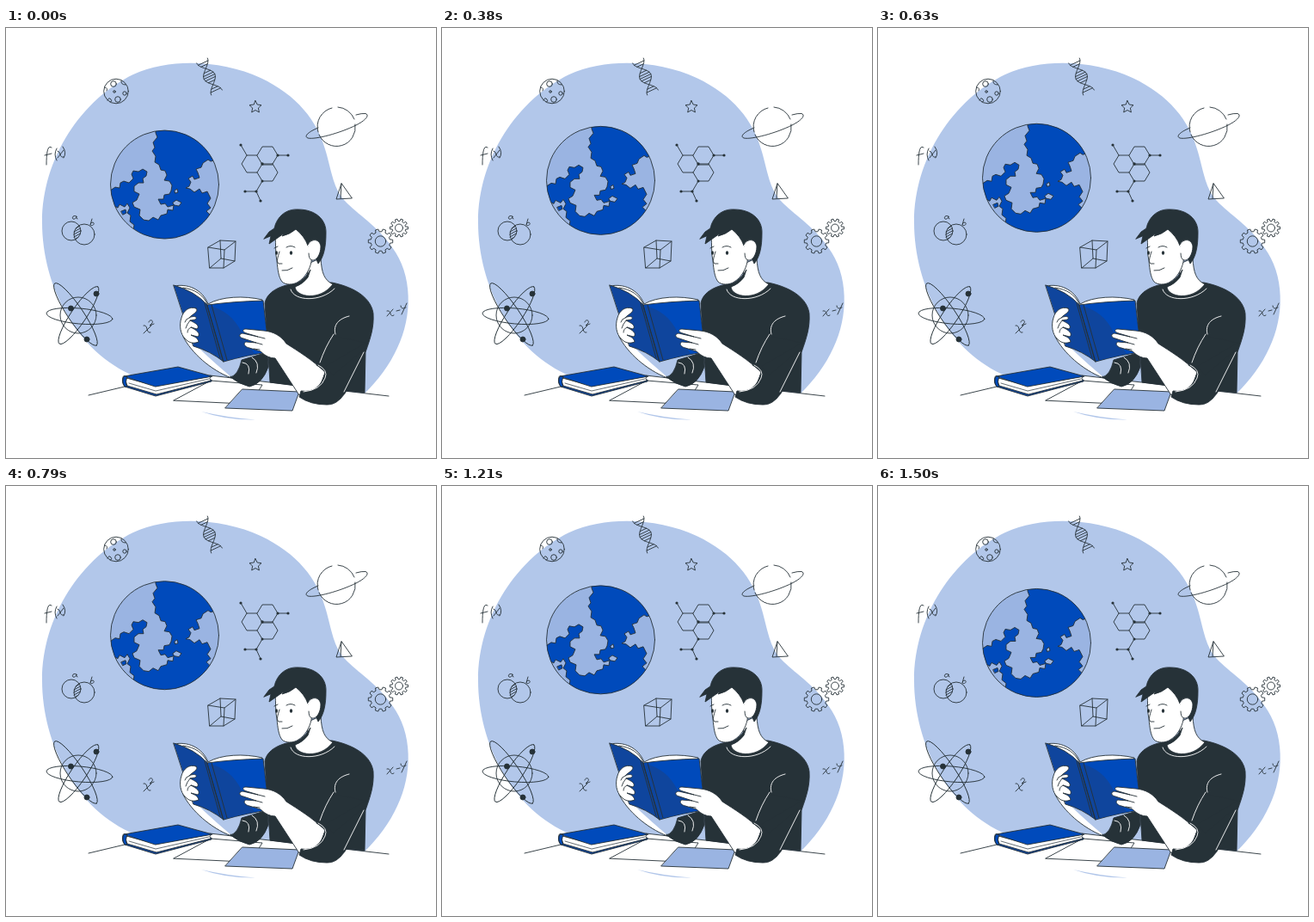
Write an HTML page that moves like this. It is 500 by 500 pixels and loops after 1540 ms.

```html
<!DOCTYPE html>
<html lang="en">
<head>
<meta charset="utf-8">
<title>Student reading</title>
<style>
  html, body { margin: 0; width: 100%; height: 100%; overflow: hidden; background: #fff; }
  svg { display: block; width: 100vw; height: 100vh; }
  .line { fill: none; }
  .white { fill: #fff; }
  .blue { fill: #004abb; }
  .navy { fill: #0f459d; }
  .pale { fill: #9ab4e2; }
  .sky { fill: #b2c7ea; stroke: none; }
  .dark { fill: #263238; }
  .crease { fill: none; stroke: #fff; }
</style>
</head>
<body>
<svg viewBox="0 0 500 500" stroke="#263238" stroke-width=".9" stroke-linecap="round" stroke-linejoin="round">
  <defs>
    <clipPath id="disc"><circle cx="184.5" cy="182" r="63"/></clipPath>
    <clipPath id="lens"><circle cx="76" cy="236" r="11"/></clipPath>
  </defs>

  <!-- backdrop and table -->
  <path class="sky" d="M42 226C42 151 88 83 148 54C193 34 252 38 296 58C338 78 362 107 372 144C379 169 381 187 394 201C409 217 431 229 449 255C473 287 473 335 455 372C446 392 433 409 417 425L150 428V405C82 377 42 300 42 226Z"/>
  <path class="white" stroke="none" d="M96 427L200 402L238 404L445 428L470 500H60Z"/>
  <path class="sky" d="M227 446Q257 453 290 455.5Q255 456 227 446Z"/>
  <path class="line" d="M96 427L138 417M237 404L445 428"/>

  <!-- floating globe -->
  <g id="globe">
    <circle class="pale" cx="184.5" cy="182" r="63" stroke="none"/>
    <g class="blue" clip-path="url(#disc)">
      <path d="M174 115L174 122L176 127L171 133L173 139L170 143L174 149L173 156L178 159L180 165L185 166L187 171L184 177L190 178L193 183L192 189L190 193L184 194L183 199L177 199L180 205L185 204L188 208L195 206L194 212L188 211L187 216L180 218L177 223L171 220L166 224L160 223L155 218L156 211L149 208L147 203L152 200L155 193L149 190L149 184L154 180L160 180L159 175L163 172L164 167L159 164L154 167L148 166L146 170L148 175L143 180L137 178L133 180L132 186L127 185L118 191L124 206L130 209L132 205L138 208L141 204L144 209L141 215L145 218L144 225L149 229L148 235L160 250L210 250L240 230L237 217L233 213L238 209L234 204L238 198L234 190L228 192L225 187L219 191L214 187L209 186L213 184L215 179L212 175L217 172L219 176L225 174L223 168L221 164L227 162L229 157L235 153L238 155L245 153L240 110Z"/>
      <path d="M134 213L139 211L140 215L136 217Z"/>
      <path class="pale" d="M196 189L199 187L200 191L197 192ZM194 203L198 200L204 203L201 207L196 206Z"/>
    </g>
    <circle class="line" cx="184.5" cy="182" r="63"/>
  </g>

  <!-- science doodles -->
  <g class="line">
    <circle cx="128" cy="73.5" r="14.3"/>
    <circle cx="125" cy="65" r="3.3"/><circle cx="130" cy="83" r="3.3"/>
    <circle cx="138" cy="76" r="2.2"/><circle cx="126" cy="74" r="1.3"/><path d="M134 61q-1 5 5 5M115 69q4 1 2 4M118 84q2-4 4-1t-1 3"/>

    <path id="helix"/>
    <path d="M290 84.5L292.2 89L297 89.7L293.4 93L294.4 98L290 95.5L285.7 98L286.7 93L283 89.7L288 89Z"/>
    <path d="M363 121A22 22 0 0 1 379 93M386 92A22 22 0 0 1 405 106M406 112A22 22 0 0 1 364 124M363 116C351 121 346 126 351 128C360 130 389 122 407 113C419 107 423 101 418 99.5Q414 99 407 101"/>
    <path d="M292 148L298 138H310L316 148L310 158H298ZM292 148H280L274 158L280 168H292L298 158M292 168L298 178H310L316 168L310 158M280 148L273 136M316 148H328M298 178L291 190H278M291 190L296 201M298 159H310"/>
    <g class="dark" stroke="none"><circle cx="273" cy="136" r="1.6"/><circle cx="328" cy="148" r="1.6"/><circle cx="316" cy="148" r="1.6"/><circle cx="298" cy="158" r="1.7"/><circle cx="298" cy="178" r="1.5"/><circle cx="278" cy="190" r="1.6"/><circle cx="291" cy="190" r="1.6"/><circle cx="296" cy="201" r="1.6"/></g>
    <path d="M390 181L384 199L402 198ZM390 181L389 198"/>
    <path id="gearA"/><circle cx="435.5" cy="248" r="6.2"/>
    <path id="gearB"/><circle cx="457" cy="232.5" r="4.5"/>

    <path d="M235 255L249 247L267 248L266 271L253 279L237 279ZM235 255L254 258L267 248M254 258L253 279M249 247L250 268L266 271M250 268L237 279"/>
    <circle cx="76" cy="236" r="11"/><circle cx="91" cy="240" r="12"/>
    <path clip-path="url(#lens)" d="M81 233L88 229M79 237L88 232M79 240L88 235M79 243L88 238M81 245L88 241"/>
    <path d="M82 219C79 217 76 220 78 222C80 223 82 220 82 219Q81 222 83 222M100 222L98 229C101 231 104 227 101 226Q99 226 98 228"/>
    <path d="M53 139C49 136 47 142 47 159M45 148L53 146M59 140Q55 147 59 154M60 143Q62 143 63 147T67 150M67 142L60 151M66 138Q71 145 67 151"/>
    <path d="M160 346Q163 345 164 350T168 354M169 346L160 355M166 342C167 338 172 340 170 343L167 346L172 344"/>
    <path d="M443 329Q446 328 447 332T451 334M450 327L443 335M454 329L458 328M459 323Q459 328 465 325M466 320L460 333"/>
    <circle cx="84" cy="334" r="21"/>
    <ellipse cx="85.5" cy="335" rx="38.5" ry="9" transform="rotate(5 85.5 335)"/>
    <ellipse cx="81" cy="333" rx="43.5" ry="9" transform="rotate(56 81 333)"/>
    <ellipse cx="84.5" cy="334" rx="40" ry="9" transform="rotate(-56 84.5 334)"/>
    <g class="dark"><circle cx="105" cy="309" r="3"/><circle cx="75.5" cy="326" r="3"/><circle cx="94" cy="362" r="3"/></g>
  </g>

  <!-- closed book and papers -->
  <path class="white" d="M195 433L238 410L298 415L284 437Z"/>
  <path class="pale" d="M275 420L341 423L333 445L255 442Z"/>
  <path class="navy" d="M136 406Q134 412 138 417L174 428L239 411V409L175 425L141 415Z"/>
  <path class="white" d="M140 407L174 416L238 405Q236 408 238 410L175 426L141 416Q138 411 140 407Z"/>
  <path class="line" stroke-width=".7" d="M143 413L174 422L236 408"/>
  <path class="blue" d="M137 405L200 394L240 405L174 417Z"/>
  <path class="blue" d="M137 405Q134 411 138 417L141 417Q138 411 141 406Z"/>

  <!-- reader -->
  <path class="dark" d="M331 298C314 301 303 309 301 320L307 412L345 417L417 424L418 377C424 360 428 348 427 332C425 316 409 302 379 296Z"/>
  <path class="white" d="M352 274L350 289L336 301C337 313 365 318 380 298C370 293 367 285 366 268Z"/>
  <path class="crease" d="M331 304C335 318 366 319 382 303"/>
  <path class="dark" d="M335 298C344 295 350 288 354 281L351 290Q345 298 336 301Z"/>
  <path class="white" d="M313 242C314 252 313 262 315 271C316 281 317 290 321 295C325 299 334 299 340 295C348 290 353 281 355 272L357 240L336 229Z"/>
  <path class="dark" d="M300 245L306 237L312 233C315 219 326 210 340 211C360 211 373 223 372 239C372 253 370 266 363 274L358 262L351 253Q347 242 337 234Q330 240 321 242L323 239L306 251L308 242Z"/>
  <path class="white" d="M351 252C355 244 365 245 366 254C366 263 361 271 356 270Q352 269 352 262"/>
  <path class="line" d="M318 260C316 267 314 272 317 274L321 274M321 282Q327 283 333 279M312 256L316 254M326 255Q331 252 336 255"/>
  <g class="dark" stroke="none"><ellipse cx="314.5" cy="261.5" rx="1.5" ry="2.2"/><ellipse cx="331.5" cy="261.5" rx="1.6" ry="2.3"/></g>

  <path class="white" d="M206 359C216 378 237 397 262 407L256 390L240 365Z"/>
  <path class="sky" d="M224 372L250 384L275 384L270 398L261 405Q244 391 224 372Z"/>
  <path class="dark" d="M261 406Q270 404 274 386L304 377L305 394Q298 414 283 417Q271 414 261 406Z"/>
  <path class="crease" d="M275 389Q285 390 282 402M286 383Q296 389 291 401"/>

  <!-- open book -->
  <path class="white" d="M196 300C210 297 228 303 235 321C250 312 277 311 298 316L290 330L236 330Z"/>
  <path class="line" d="M206 302C220 304 229 310 234 321"/>
  <path class="navy" d="M195 299Q220 306 234 322L253 388Q238 376 218 370Z"/>
  <path class="blue" d="M234 322Q264 318 299 317L306 377Q281 380 253 388Z"/>
  <path class="navy" stroke="none" d="M236 323C254 327 266 338 273 352L289 379L253 387Z"/>
  <path class="line" d="M234 322L253 388M239 322L257 386M231 320L249 384"/>

  <!-- hands and near sleeve -->
  <path class="white" d="M221 326C213 323 206 329 204 337C201 346 203 356 208 361C213 367 219 367 224 365C223 360 219 359 215 357L223 359C227 355 221 351 215 348L222 350C226 346 220 343 214 340L220 339C224 336 218 334 213 337C216 333 225 330 221 326Z"/>
  <path class="line" d="M213 337Q209 338 208 342M214 340Q210 345 209 349M215 348Q211 350 211 354"/>
  <path class="white" d="M371 400C355 385 340 376 326 367C320 358 311 353 300 352L279 350C274 350 275 354 280 355L293 359L275 355C270 356 271 360 276 361L291 366L279 365C275 367 278 371 283 372L296 376Q304 384 313 384L341 427L362 425Z"/>
  <path class="line" d="M293 359L301 361M291 366L298 368M288 373L295 374"/>
  <path class="dark" d="M371 394Q378 400 380 404L418 372Q408 404 394 425Q384 439 373 438Q354 438 341 429L343 422Q365 425 371 401Q370 397 361 392L380 358L418 366Z"/>
  <path class="crease" d="M399 335C387 338 380 345 383 356M381 356Q371 371 365 389M416 377L393 423M363 392Q375 398 371 407Q366 421 346 423"/>
</svg>
<script>
  const PERIOD = 1540, RISE = 9.5, LEAD = 35;
  const globe = document.getElementById('globe');

  function setPath(id, d) {
    document.getElementById(id).setAttribute('d', d);
  }

  function gear(id, cx, cy, inner, outer, teeth) {
    const points = [];
    for (let i = 0; i < teeth; i++) {
      for (const [offset, r] of [[-.3, inner], [-.2, outer], [.2, outer], [.3, inner]]) {
        const a = (i + offset) / teeth * 2 * Math.PI;
        points.push(`${cx + r * Math.cos(a)} ${cy + r * Math.sin(a)}`);
      }
    }
    setPath(id, `M${points.join('L')}Z`);
  }
  gear('gearA', 435.5, 248, 11.3, 14.3, 10);
  gear('gearB', 457, 232.5, 8, 10.6, 10);

  // Point on one strand of the double helix; side is 1 or -1.
  function strand(s, side) {
    const swing = 7 * side * Math.cos(2 * Math.PI * s);
    return `${228 + 17 * s - .9 * swing} ${38 + 37 * s + .42 * swing}`;
  }
  const steps = Array.from({ length: 25 }, (_, i) => i / 24);
  const rungs = [.07, .15, .35, .43, .5, .57, .65, .85, .93];
  setPath('helix',
    [1, -1].map(side => 'M' + steps.map(s => strand(s, side)).join('L')).join('') +
    rungs.map(s => `M${strand(s, 1)}L${strand(s, -1)}`).join(''));

  // Linear rise and fall, slightly past the lowest point at time zero.
  function draw(now) {
    const phase = (now + LEAD) % PERIOD / PERIOD;
    const lift = RISE * (1 - Math.abs(1 - 2 * phase));
    globe.setAttribute('transform', `translate(0 ${0.5 - lift})`);
    requestAnimationFrame(draw);
  }
  draw(performance.now());
</script>
</body>
</html>
```
